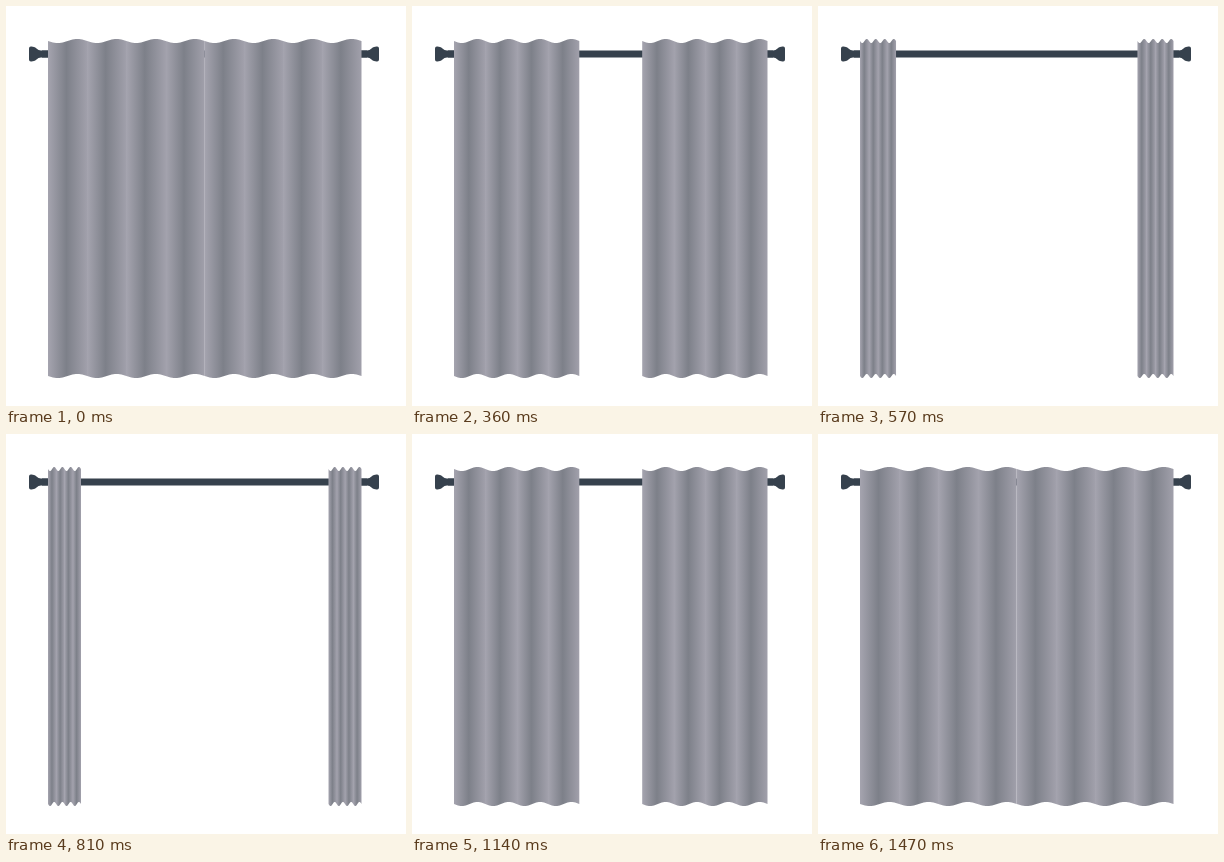
An HTML page with a canvas for the animation above (1500 ms loop, 400 by 400 pixels).

```html
<!DOCTYPE html>
<html lang="en">
<head>
<meta charset="utf-8">
<title>Curtains</title>
<style>
  html, body { margin: 0; width: 100%; height: 100%; overflow: hidden; background: #fff; }
  canvas { display: block; width: 400px; height: 400px; }
</style>
</head>
<body>
<canvas id="stage" width="400" height="400"></canvas>
<script>
const ctx = document.getElementById('stage').getContext('2d');
const LOOP = 1500, STEP = 30;
const LEFT = 42, RIGHT = 355.5, TOP = 35, BOTTOM = 370;
const FULL = (RIGHT - LEFT) / 2, GATHERED = 32.7;
const FOLDS = 4, WAVE = 2;

// Closed form of cubic-bezier(1, 0, 0, 1)
function ease(x) {
  const s = 0.5 + Math.cbrt((x - 0.5) / 4);
  return s * s * (3 - 2 * s);
}

function drawCap(x, dir) {
  ctx.save();
  ctx.translate(x, 48);
  ctx.scale(dir, 1);
  ctx.fill(new Path2D('M0 -5.5Q0 -7.8 2.5 -7.4L5 -6.9Q6.3 -6.6 7.5 -5.4Q9.3 -3.4 12 -3.4H20V3.4H12Q9.3 3.4 7.5 5.4Q6.3 6.6 5 6.9L2.5 7.4Q0 7.8 0 5.5Z'));
  ctx.restore();
}

function drawRod() {
  ctx.fillStyle = '#36414d';
  ctx.fillRect(36, 44.5, 325, 7);
  drawCap(23, 1);
  drawCap(373, -1);
}

function drawCurtain(x, width) {
  const shade = ctx.createLinearGradient(x, 0, x + width, 0);
  for (let i = 0; i < FOLDS; i++) {
    shade.addColorStop(i / FOLDS, '#a5a4af');
    shade.addColorStop((i + 0.47) / FOLDS, '#7d8089');
    shade.addColorStop((i + 1) / FOLDS, '#a1a0ab');
  }
  const steps = 96;
  const edge = (i, y) => ctx.lineTo(
    x + width * i / steps,
    y + WAVE * Math.sin(2 * Math.PI * FOLDS * i / steps));
  ctx.beginPath();
  for (let i = 0; i <= steps; i++) edge(i, TOP);
  for (let i = steps; i >= 0; i--) edge(i, BOTTOM);
  ctx.closePath();
  ctx.fillStyle = shade;
  ctx.fill();
}

function draw(now) {
  const time = Math.floor((now % LOOP) / STEP) * STEP;
  const phase = time / (LOOP / 2);
  const open = ease(phase < 1 ? phase : 2 - phase);
  const width = FULL + (GATHERED - FULL) * open;
  ctx.clearRect(0, 0, 400, 400);
  drawRod();
  drawCurtain(LEFT, width);
  drawCurtain(RIGHT - width, width);
}

const start = performance.now();
function tick() {
  draw(performance.now() - start);
  requestAnimationFrame(tick);
}
tick();
</script>
</body>
</html>
```
